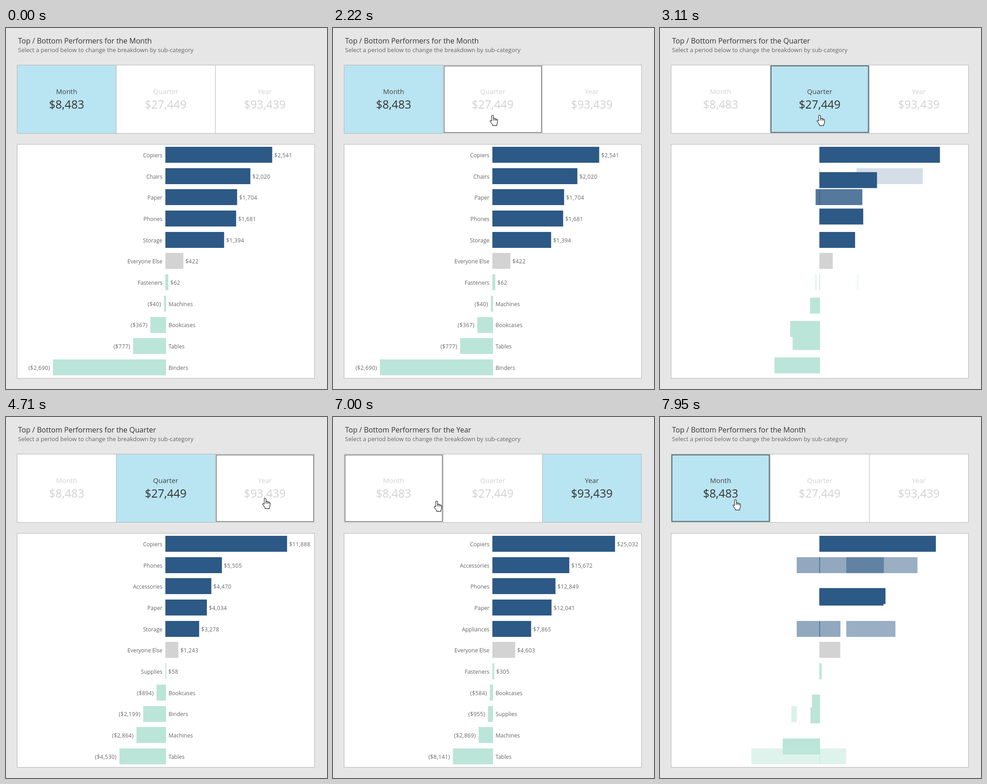
Animation of 706 by 793 pixels, one loop 7.99 s. Source, as an HTML page:

```html
<!DOCTYPE html>
<html lang="en">
<head>
<meta charset="utf-8">
<title>Top / Bottom Performers</title>
<style>
  html, body { margin: 0; width: 100%; height: 100%; overflow: hidden; background: #e6e6e6; }
  svg { display: block; width: 706px; height: 793px; font-family: "Open Sans", "Noto Sans", sans-serif; }
  .frame { fill: none; stroke: #b3b3b3; }
  .title { font-size: 16px; fill: #333; }
  .hint { font-size: 13px; fill: #666; }
  .tile rect { fill: #fff; }
  .tile text { text-anchor: middle; fill: #d2d2d2; }
  .tile .name { font-size: 15px; }
  .tile .sum { font-size: 25px; }
  .tile.on rect { fill: #b9e4f1; }
  .tile.on .name { fill: #444; }
  .tile.on .sum { fill: #333; }
  .labels { font-size: 12px; fill: #666; }
  .labels .num { letter-spacing: .4px; }
  .labels .end { text-anchor: end; }
  .pointer { fill: #fff; stroke: #222; stroke-width: 1.2; stroke-linejoin: round; stroke-linecap: round; }
</style>
</head>
<body>
<svg viewBox="0 0 706 793">
  <text class="title" x="26.5" y="34" id="title"></text>
  <text class="hint" x="26.5" y="53">Select a period below to change the breakdown by sub-category</text>
  <g id="tiles"></g>
  <path class="frame" d="M24.5 81.5H678.5V231.5H24.5ZM242.5 81.5V231.5M460.5 81.5V231.5"/>
  <g id="outline" fill="none" stroke="#333">
    <rect id="halo" x="25.5" y="82.5" width="214" height="146" stroke-opacity=".3"/>
    <rect x="26.5" y="83.5" width="214" height="146"/>
  </g>
  <rect x="24.5" y="255.5" width="654" height="514" fill="#fff" stroke="#b3b3b3"/>
  <g id="bars"></g>
  <g id="labels" class="labels"></g>
  <g id="cursor">
    <circle id="ring" r="11" fill="#888" fill-opacity=".1" stroke="#888" stroke-opacity=".4"/>
    <g id="hand" class="pointer">
      <path d="M-2 2.5Q-2 .6 0 .6Q2 .6 2 2.5V8Q4 6.5 5.3 8.6Q7.3 7.4 8.3 9.6Q10.8 9 10.8 11.5V16Q10.8 19 9 21V23.4H0V21.5L-5.2 14.5Q-6 12.5 -4.2 12Q-3 12 -2 13.5Z"/>
      <path fill="none" d="M2 8V12M5.3 8.6V12M8.3 9.6V12.2"/>
    </g>
    <path id="arrow" class="pointer" d="M0 0V16.5L3.9 12.9L6.4 18.6L9 17.5L6.6 12H12Z"/>
  </g>
</svg>
<script>
const LOOP = 7990, ZERO = 351.2, FADE = 300;
const BLUE = '#2c5985', GRAY = '#d3d3d3', MINT = '#bbe5d8';
const $ = id => document.getElementById(id);

const periods = [
  { name: 'Month', sum: '$8,483', scale: 0.0922, rows: {
    Copiers: 2541, Chairs: 2020, Paper: 1704, Phones: 1681, Storage: 1394, 'Everyone Else': 422,
    Fasteners: 62, Machines: -40, Bookcases: -367, Tables: -777, Binders: -2690 } },
  { name: 'Quarter', sum: '$27,449', scale: 0.02246, rows: {
    Copiers: 11888, Phones: 5505, Accessories: 4470, Paper: 4034, Storage: 3278, 'Everyone Else': 1243,
    Supplies: 58, Bookcases: -894, Binders: -2199, Machines: -2864, Tables: -4530 } },
  { name: 'Year', sum: '$93,439', scale: 0.01075, rows: {
    Copiers: 25032, Accessories: 15672, Phones: 12849, Paper: 12041, Appliances: 7865, 'Everyone Else': 4603,
    Fasteners: 305, Bookcases: -584, Supplies: -955, Machines: -2869, Tables: -8141 } }
];

// Bar geometry for each period, keyed by category
for (const p of periods) {
  p.bars = {};
  Object.entries(p.rows).forEach(([name, value], i) => {
    p.bars[name] = {
      value, zero: ZERO, end: ZERO + value * p.scale,
      y: Math.floor(261.4 + 46.7 * i),
      color: i < 5 ? BLUE : i === 5 ? GRAY : MINT
    };
  });
  const ends = Object.values(p.bars).map(b => b.end);
  p.min = Math.min(...ends);
  p.max = Math.max(...ends);
}

const switches = [
  { from: 0, to: 1, start: 2870, done: 3210 },
  { from: 1, to: 2, start: 5510, done: 5790 },
  { from: 2, to: 0, start: 7808, done: 8150 }
];
const clicks = [[2590, 2730], [5220, 5320], [7520, 7660]];
// start, end, from x, y, to x, y, bow
const moves = [
  [1270, 2030, 654, 761, 363, 216, 0],
  [2030, 2220, 363, 216, 351, 191, 0],
  [4000, 4710, 351, 191, 570, 178, 0],
  [6480, 7240, 570, 178, 168, 182, 6],
  [7240, 7290, 168, 182, 166, 181, 0]
];

const lerp = (a, b, k) => a + (b - a) * k;
const clamp = k => Math.max(0, Math.min(1, k));
const sine = k => (1 - Math.cos(Math.PI * k)) / 2;
const glide = k => k < .5 ? (2 * k) ** 2.6 / 2 : 1 - (2 - 2 * k) ** 2.6 / 2;
const money = v => {
  const s = '$' + Math.abs(v).toLocaleString('en-US');
  return v < 0 ? `(${s})` : s;
};

// A bar together with the thin mark that stays on the zero line
function rect(bar, alpha = 1) {
  const box = (x, w) => `<rect x="${x}" y="${bar.y}" width="${w}" height="35" fill="${bar.color}" opacity="${alpha}"/>`;
  return box(Math.min(bar.zero, bar.end), Math.abs(bar.end - bar.zero)) + box(350.5, 1.5);
}

// Stretches a bar so that the data extent of a fills that of b
function refit(bar, a, b) {
  const m = (b.max - b.min) / (a.max - a.min);
  const map = x => b.min + (x - a.min) * m;
  return { ...bar, zero: map(bar.zero), end: map(bar.end) };
}

function mix(a, b, kx, ky) {
  return { color: b.color, zero: lerp(a.zero, b.zero, kx), end: lerp(a.end, b.end, kx), y: lerp(a.y, b.y, ky) };
}

function blend(a, b, k) {
  const ky = sine(k), kx = ky ** (((b.max - b.min) / (a.max - a.min)) ** .67);
  let out = '';
  for (const [name, bar] of Object.entries(a.bars))
    if (!b.bars[name]) out += rect(mix(bar, refit(bar, a, b), kx, ky), 1 - k);
  for (const [name, bar] of Object.entries(b.bars))
    out += a.bars[name] ? rect(mix(a.bars[name], bar, kx, ky))
                        : rect(mix(refit(bar, b, a), bar, kx, ky), k);
  return out;
}

function labelsOf(p) {
  return Object.entries(p.bars).map(([name, b], i) => {
    const y = 283.8 + 46.7 * i;
    const text = (x, cls, s) => `<text x="${x}" y="${y}" class="${cls}">${s}</text>`;
    return b.value > 0
      ? text(344, 'end', name) + text(b.end + 4.5, 'num', money(b.value))
      : text(b.end - 6.2, 'num end', money(b.value)) + text(357.5, '', name);
  }).join('');
}

$('tiles').innerHTML = periods.map((p, i) => {
  const x = 24.5 + 218 * i, c = x + 108.7;
  return `<g class="tile"><rect x="${x}" y="81.5" width="218" height="150"/>
    <text class="name" x="${c}" y="145">${p.name}</text>
    <text class="sum" x="${c}" y="176.5">${p.sum}</text></g>`;
}).join('');
const tiles = [...$('tiles').children];

let shown = '';
function drawChart(t) {
  const sw = switches.filter(s => t >= s.start).pop();
  const now = sw ? sw.to : 0, moving = sw && t < sw.done;
  const key = moving ? 'moving' + t : 'rest' + now;
  if (key === shown) return;
  shown = key;
  const p = periods[now];
  $('title').textContent = `Top / Bottom Performers for the ${p.name}`;
  tiles.forEach((el, i) => el.classList.toggle('on', i === now));
  $('bars').innerHTML = moving
    ? blend(periods[sw.from], p, clamp((t - sw.start) / FADE))
    : Object.values(p.bars).map(b => rect(b)).join('');
  $('labels').innerHTML = moving ? '' : labelsOf(p);
}

function show(id, on) {
  $(id).style.display = on ? '' : 'none';
}

function drawCursor(t) {
  const move = moves.filter(m => t >= m[0]).pop();
  show('cursor', move);
  show('outline', false);
  if (!move) return;
  const [start, end, x0, y0, x1, y1, bow] = move;
  const k = glide(clamp((t - start) / (end - start)));
  const x = lerp(x0, x1, k), y = lerp(y0, y1, k) + bow * Math.sin(Math.PI * k);
  const over = y > 82 && y < 231 ? Math.floor((x - 24.5) / 218) : -1;
  $('cursor').setAttribute('transform', `translate(${Math.round(x)} ${Math.round(y)})`);
  show('hand', over >= 0);
  show('arrow', over < 0);
  show('ring', clicks.some(([a, b]) => t >= a && t < b));
  show('outline', over >= 0);
  show('halo', clicks.some(([a]) => t >= a && start <= a));
  $('outline').setAttribute('transform', `translate(${218 * over} 0)`);
}

const begin = performance.now();
function tick() {
  const t = (performance.now() - begin) % LOOP;
  drawChart(t);
  drawCursor(t);
  requestAnimationFrame(tick);
}
tick();
</script>
</body>
</html>
```
